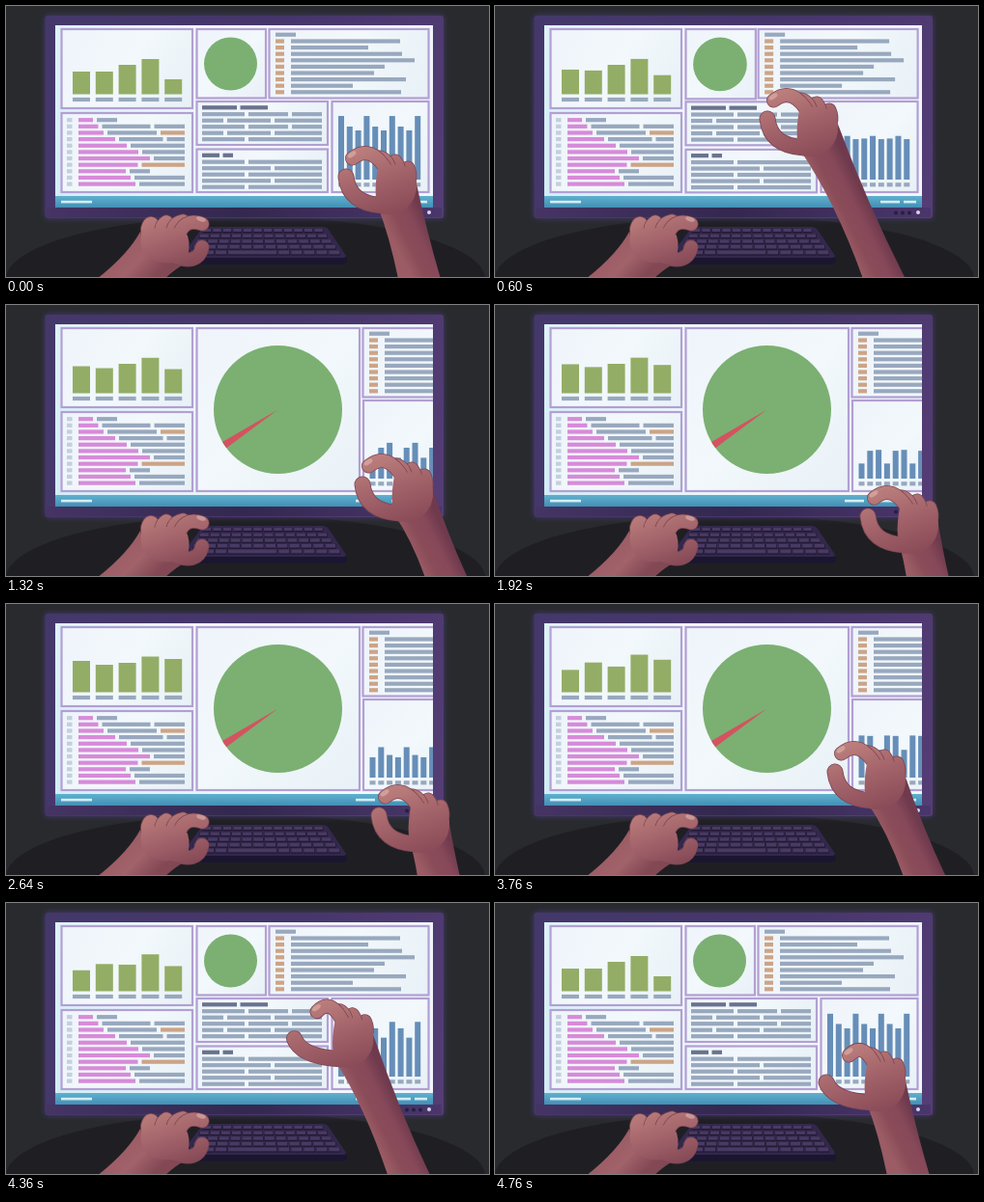
An HTML page with a canvas that plays this animation: 500 px wide and 281 px high, repeating every 4.8 s.

```html
<!DOCTYPE html>
<html lang="en">
<head>
<meta charset="utf-8">
<title>Desk dashboard</title>
<style>
html, body { margin: 0; width: 100%; height: 100%; overflow: hidden; background: #282a2e; }
canvas { display: block; width: 500px; height: 281px; }
</style>
</head>
<body>
<canvas id="stage"></canvas>
<script>
const LOOP = 4800;
const GREY = '#98a8be', DARK = '#69738e', PINK = '#d78bd9', TAN = '#cda486';
const canvas = document.getElementById('stage');
const ratio = window.devicePixelRatio || 1;
canvas.width = 500 * ratio;
canvas.height = 281 * ratio;
const c = canvas.getContext('2d');
c.scale(ratio, ratio);
c.lineCap = c.lineJoin = 'round';

// Hand poses: x, y and the arm's right edge at the stage bottom
const LOW = [70, 60, 450], HIGH = [0, 0, 425], WIDE = [87, 69, 478];
const REST = [104, 102, 470], GRAB = [70, 57, 467], LIFT = [11, 0, 436];
const reach = [
  [0, ...LOW], [560, ...HIGH], [640, ...HIGH], [1320, ...WIDE], [1680, ...REST], [3400, ...REST],
  [3740, ...GRAB], [3840, ...GRAB], [4080, ...LIFT], [4200, ...LIFT], [4700, ...LOW]
];
const pinch = [[3840, 0], [4080, 1], [4760, 1], [LOOP, 0]];
const zoom = [[560, 0], [1300, 1], [3840, 1], [4250, 0]];

const smooth = u => u * u * (3 - 2 * u);
const mix = (a, b, u) => a + (b - a) * u;

// Each key is [position, ...values]; the ends are held
function sample(keys, t, ease = u => u) {
  let i = 0;
  while (i < keys.length - 2 && t >= keys[i + 1][0]) i++;
  const a = keys[i], b = keys[i + 1];
  const u = ease(Math.min(1, Math.max(0, (t - a[0]) / (b[0] - a[0]))));
  return a.slice(1).map((v, k) => mix(v, b[k + 1], u));
}

function box(x0, y0, x1, y1, fill) {
  c.fillStyle = fill;
  c.fillRect(x0, y0, x1 - x0, y1 - y0);
}

function dash(x0, x1, y, fill = GREY) { box(x0, y - 2.1, x1, y + 2.1, fill); }

function disc(x, y, r, fill) {
  c.fillStyle = fill;
  c.beginPath();
  c.arc(x, y, r, 0, 7);
  c.fill();
}

function ramp(x0, y0, x1, y1, ...stops) {
  const g = c.createLinearGradient(x0, y0, x1, y1);
  stops.forEach((s, i) => g.addColorStop(i / (stops.length - 1), s));
  return g;
}

function shape(d, fill) {
  c.fillStyle = fill;
  c.fill(new Path2D(d));
}

function panel(x0, y0, x1, y1) {
  box(x0, y0, x1, y1, ramp(x0, y0, x1, y1, '#eef4fa', '#f2f8fb', '#e8f1f7'));
  c.strokeStyle = '#b29fd3';
  c.lineWidth = 2.2;
  c.strokeRect(x0, y0, x1 - x0, y1 - y0);
}

function room() {
  box(0, 0, 500, 281, '#282a2e');
  c.fillStyle = '#1f1f23';
  c.beginPath();
  c.ellipse(248, 283, 248, 65, 0, 0, 7);
  c.fill();
  c.save();
  c.shadowColor = '#493a70';
  c.shadowBlur = 6 * ratio;
  c.fillStyle = ramp(40, 10, 453, 220, '#44386a', '#46366b', '#553d75');
  c.beginPath();
  c.roundRect(40.5, 10, 412.5, 210, 3);
  c.fill();
  c.restore();
  box(42, 209, 451, 219, ramp(42, 0, 451, 0, '#453464', '#33284f', '#4a366b'));
  for (const x of [415, 422, 429]) disc(x, 214.5, 2, '#271f40');
  disc(438, 214, 2, '#d8d4e8');
}

function salesPanel(t) {
  panel(57.5, 24, 193, 106);
  const start = [68, 68, 61, 55, 76];
  const tops = sample([[0, ...start], [2640, 59, 63, 61, 54.5, 57],
    [4080, 71, 60, 66, 52, 58], [4760, ...start]], t);
  tops.forEach((top, i) => {
    const x = 69 + 23.8 * i;
    box(x, top, x + 18, 91.5, '#93ad66');
    dash(x, x + 18, 97);
  });
}

function codePanel() {
  panel(57.5, 111, 193, 193);
  const outline = [[0, 90], [2, 101], [6, 149], [8, 124], [10, 134]];
  for (let i = 0; i < 11; i++) {
    const y = 118.2 + 6.64 * i;
    const pink = sample(outline, i)[0];
    const end = i % 8 ? 185 : pink + 25;
    const split = i > 0 && i < 4 ? 143 + 6.5 * i : end;
    dash(63, 68.5, y, '#c3d0de');
    dash(75, pink, y, PINK);
    dash(pink + 4, split, y, i === 7 ? TAN : GREY);
    if (split < end) dash(split + 4, end, y, i === 2 ? TAN : GREY);
  }
}

function listPanel(dx) {
  c.save();
  c.translate(dx, 0);
  panel(272.5, 24, 437.5, 95.5);
  dash(279, 300, 29.7);
  [408, 375, 410, 423, 392, 381, 414, 359, 409].forEach((end, i) => {
    const y = 36.5 + 6.6 * i;
    dash(279, 288, y, TAN);
    dash(295, end, y);
  });
  c.restore();
}

// Three interleaved groups of bars sink and rise once per loop
function loadPanel(t, dx) {
  const a = Math.PI * t / LOOP;
  const tops = [[114, 48, 8], [125, 25, 4], [129, 26, -6]].map(
    ([base, swing, skew]) => base + swing * Math.sin(a) + skew * Math.sin(2 * a));
  c.save();
  c.translate(dx, 0);
  panel(337.5, 99, 437.5, 193);
  for (let i = 0; i < 10; i++) {
    const x = 344 + 8.8 * i;
    box(x, tops[i % 3], x + 6, 180, '#668eb8');
    dash(x, x + 6, 185.3);
  }
  c.restore();
}

function note(y, bottom, head, busy) {
  panel(197.5, y, 333, bottom);
  dash(203, head, y + 6.3, DARK);
  dash(head + 3.5, head * 2 - 207, y + 6.3, DARK);
  for (let i = 0; i < 5; i++) {
    const odd = i % 2;
    const gaps = [odd ? 276 : 249];
    if (busy && i < 4) gaps.push(odd ? 227 : 294);
    gaps.sort();
    const row = y + 13.2 + 6.5 * i;
    [203, ...gaps].forEach((x, k) => dash(k ? x + 2 : x, k < gaps.length ? gaps[k] - 2 : 327, row));
  }
}

function piePanel(p) {
  panel(197.5, 24, 269 + 97 * p, 95.5 + 97.5 * p);
  const x = 232.5 + 49 * p, y = 60 + 48.5 * p, r = 27.5 + 39 * p;
  const deg = Math.PI / 180;
  const mid = (160 - 13.5 * p) * deg, half = 3.3 * Math.pow(p, 1.5) * deg;
  disc(x, y, r, '#7bb072');
  c.fillStyle = '#d45360';
  c.beginPath();
  c.moveTo(x, y);
  c.arc(x, y, r, mid - half, mid + half);
  c.fill();
}

function screen(t) {
  const p = sample(zoom, t, smooth)[0];
  const lag = Math.pow(p, 1.4);
  const drop = 100 * Math.pow(p, 1.2);
  c.save();
  c.beginPath();
  c.rect(51, 20, 391, 189);
  c.clip();
  box(51, 20, 442, 209, ramp(51, 209, 442, 20, '#d0edf6', '#f4fafd', '#eef5fa'));
  c.lineJoin = 'miter';
  salesPanel(t);
  codePanel();
  note(99 + drop, 144 + drop, 239, true);
  note(148.5 + drop, 193 + drop, 221, false);
  listPanel(97 * lag);
  loadPanel(t, 32.5 * lag);
  piePanel(p);
  box(51, 197, 442, 209, ramp(0, 197, 0, 209, '#5fb0ce', '#438fb5'));
  for (const [a, b] of [[57, 89], [362, 382], [399, 419], [423, 436]]) {
    box(a, 201.8, b, 204.4, '#d5edf6');
  }
  c.restore();
}

function keyboard() {
  shape('M204 229H327Q332 229 334 232L353 262Q354 267 349 268H180L178 263Z', '#1b1630');
  shape('M204 229H327Q332 229 334 232L352 259Q352 261 348 261H180Z', '#33284c');
  for (let row = 0; row < 5; row++) {
    const y = 231 + 5.6 * row, h = 4.3 + row * .25;
    const left = 203 - row * 3.2, right = 329 + row * 4.4;
    const step = (right - left) / 12;
    for (let k = 0; k < 12; k++) {
      const space = row === 4 && k === 3;
      const x = left + k * step, end = x + (space ? 4 : 1) * step;
      box(x + .4, y, end - .6, y + h, '#211932');
      box(x + .8, y, end - 1.2, y + h - 1.3, '#493a63');
      if (space) k += 3;
    }
  }
}

function finger(d, width, skin) {
  const path = new Path2D(d);
  c.strokeStyle = '#7d4653';
  c.lineWidth = width;
  c.stroke(path);
  c.strokeStyle = skin;
  c.lineWidth = width - 1.6;
  c.stroke(path);
}

function nail(x, y, tilt) {
  c.fillStyle = 'rgba(226,187,178,.55)';
  c.beginPath();
  c.ellipse(x, y, 5, 2.4, tilt, 0, 7);
  c.fill();
}

function rightHand(t) {
  const [x, y, edge] = sample(reach, t, smooth);
  const open = sample(pinch, t, smooth)[0];
  const floor = 283 - y, right = edge - x, left = right - 44;
  const skin = ramp(302, 84, 328, 156, '#bd807d', '#a3636a', '#8a4c58');
  const curl = 8 * open, spread = 9 * open;
  c.save();
  c.translate(x, y);
  shape(`M354 120 Q${mix(354, right, .46)} ${mix(120, floor, .54)} ${right} ${floor}
    H${left} Q${mix(315, left, .58)} ${mix(148, floor, .42)} 315 148 Z`,
    ramp(328, 178, 364, 160, '#9b5c65', '#8a4c58', '#87495a', '#6f3a4d'));
  finger('M338 132Q352 122 346 108', 15, skin);
  finger('M334 126Q340 110 333 101', 15, skin);
  finger(`M328 120Q328 100 ${317 + curl / 3} 97`, 15, skin);
  finger(`M320 147Q${285 - spread / 2} 145 ${282 - spread} ${117 + spread}`, 17, skin);
  finger(`M325 112Q${308 + curl / 2} 82 ${288.5 + curl} 98`, 15, skin);
  shape('M315 108Q332 100 351 110Q358 124 353 138Q342 160 318 155Q309 140 315 108Z', skin);
  nail(288 + curl, 94, -.6);
  c.restore();
}

function leftHand() {
  const skin = ramp(162, 214, 182, 274, '#b97c7a', '#a2626a', '#844956');
  shape('M94 283Q126 258 139 234L188 250Q192 264 184 268Q176 272 164 283Z',
    ramp(118, 252, 150, 284, '#9a5b64', '#a1626a', '#824854'));
  finger('M172 259Q199 270 203 250', 15, skin);
  finger('M153 242Q145 234 150 227', 18, skin);
  finger('M163 242Q158 229 166 224', 15, skin);
  finger('M174 242Q169 226 183 223', 15, skin);
  finger('M178 241Q183 219 203 226', 15, skin);
  shape('M141 233Q158 228 180 231L188 238Q192 252 186 262Q168 271 148 262Q136 250 141 233Z', skin);
  nail(202, 221, .3);
}

function frame() {
  const t = performance.now() % LOOP;
  room();
  screen(t);
  keyboard();
  c.lineJoin = 'round';
  leftHand();
  rightHand(t);
  requestAnimationFrame(frame);
}
frame();
</script>
</body>
</html>
```
